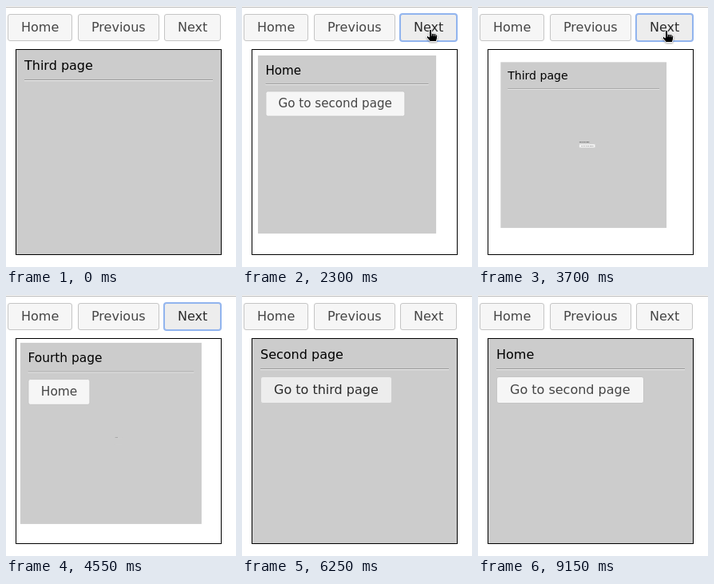
Animation, 288 px wide and 327 px high, one loop 9600 ms. Source, as an HTML page:

```html
<!DOCTYPE html>
<html lang="en">
<head>
<meta charset="utf-8">
<title>Page zoom</title>
<style>
html, body { margin: 0; width: 100%; height: 100%; overflow: hidden; background: #fff; }
body { position: relative; font: 16px/19px "DejaVu Sans", sans-serif; color: #000; cursor: default; }
.rule { position: absolute; left: 0; top: 1px; width: 100%; height: 1px; background: #b8b8b8; }
.btn {
  display: inline-block; box-sizing: border-box; height: 34px; padding: 6.4px 16px;
  border: 1px solid #c5c5c5; border-radius: 3px; background: #f6f6f6; color: #454545;
  white-space: nowrap; vertical-align: top;
}
.btn.hover, .btn.focus { background: #ededed; border-color: #ccc; color: #2b2b2b; }
.btn.focus { border-color: #93b5ee; box-shadow: 0 0 0 1px #8fb3ee; }
.btn.active { background: #007fff; border-color: #003eff; color: #fff; }
.nav { position: absolute; top: 10px; }
.frame {
  position: absolute; left: 12px; top: 54px; width: 256px; height: 256px;
  border: 1px solid #000; overflow: hidden;
}
.page {
  position: absolute; left: 0; top: 0; box-sizing: border-box; padding: 10px;
  background: #ccc; transform-origin: 128px 128px;
}
.page hr { height: 1px; margin: 8px 0; border: 0; border-top: 1px solid #9a9a9a; background: #eee; }
#cursor {
  position: absolute; left: 0; top: 0; width: 1px; height: 1px; overflow: visible;
  filter: drop-shadow(0 1px 1px rgba(0, 0, 0, .35));
}
#cursor path { stroke: #fff; stroke-width: 1; stroke-linejoin: round; }
#cursor .crease { fill: none; stroke-width: .7; }
</style>
</head>
<body>
<div class="rule"></div>
<div class="btn nav" id="navHome" style="left:2px">Home</div>
<div class="btn nav" id="navPrev" style="left:90px">Previous</div>
<div class="btn nav" id="navNext" style="left:198px">Next</div>
<div class="frame" id="frame"></div>
<svg id="cursor">
  <path id="arrow" d="M0 0V15L3.5 11.8L6 17.4L8.3 16.4L5.8 11H10.6Z"/>
  <g id="hand">
    <path d="M-1.6 1.2Q0 -1 1.6 1.2V5.6Q3.2 4.4 4.3 5.9Q5.9 5 6.8 6.6Q8.6 6.2 8.8 8.2L8.4 11.5L7.4 15.5H-.4L-4.6 10.6Q-5.4 8.4 -3.4 8.5L-1.6 9.9Z"/>
    <path class="crease" d="M1.7 6V8.5M4.3 6.4V8.8M6.7 7V9"/>
  </g>
</svg>
<script>
const LOOP = 9600, TICK = 50, ZOOM = 400, BLUR = 9150;
const $ = id => document.getElementById(id);

function makePage(title, label) {
  const el = document.createElement('div');
  el.className = 'page';
  el.innerHTML = `<div>${title}</div><hr>` + (label ? `<div class="btn">${label}</div>` : '');
  $('frame').append(el);
  return { el, btn: el.querySelector('.btn') };
}

const home = makePage('Home', 'Go to second page');
const second = makePage('Second page', 'Go to third page');
const third = makePage('Third page');
const fourth = makePage('Fourth page', 'Home');
const pages = [home, second, third, fourth];
const buttons = [...document.querySelectorAll('.btn')];

// Each click: button goes down, then the zoom from one page to the next starts.
const clicks = [
  { down: 950, go: 1085, btn: $('navHome'), from: third, to: home },
  { down: 2100, go: 2240, btn: $('navNext'), from: home, to: second },
  { down: 3250, go: 3390, btn: $('navNext'), from: second, to: third },
  { down: 4050, go: 4200, btn: $('navNext'), from: third, to: fourth },
  { down: 4950, go: 5040, btn: fourth.btn, from: fourth, to: home },
  { down: 5800, go: 5840, btn: home.btn, from: home, to: second },
  { down: 8050, go: 8125, btn: $('navHome'), from: second, to: home }
];

// Pointer path: time, x, y
const path = [
  [250, 36, -25], [300, 40, 2], [500, 57, 37], [650, 57, 37], [700, 58, 36],
  [1400, 58, 36], [1650, 130, 70], [1900, 222, 29], [2050, 236, 29],
  [2800, 236, 29], [2850, 236, 30], [2950, 236, 30], [3000, 237, 30],
  [3100, 233, 32], [3250, 236, 30], [3900, 236, 30], [4050, 234, 31],
  [4200, 236, 30], [4550, 130, 121], [4900, 66, 119], [5400, 66, 119],
  [5650, 154, 125], [6250, 154, 125], [6500, 205, 160], [6750, 250, 172],
  [7000, 240, 110], [7250, 150, 14], [7450, 80, 2], [7700, 60, 20],
  [7850, 58, 25], [8950, 58, 25], [9100, 50, 3], [9150, 46, -25]
];

const swing = k => .5 - Math.cos(Math.PI * k) / 2;

function pointerAt(t) {
  const i = path.findIndex(p => p[0] > t);
  if (i < 1) return [-50, -50];
  const a = path[i - 1], b = path[i], k = (t - a[0]) / (b[0] - a[0]);
  return [a[1] + (b[1] - a[1]) * k, a[2] + (b[2] - a[2]) * k];
}

function place(page, scale, size, z) {
  const s = page.el.style;
  s.display = scale > 0 ? 'block' : 'none';
  s.width = s.height = size + 'px';
  s.transform = scale === 1 ? 'none' : `scale(${scale})`;
  s.zIndex = z;
}

function showPages(t) {
  const last = clicks.filter(c => c.go <= t).pop();
  const k = last ? (t - last.go) / ZOOM : 1;
  const moving = k < 1;
  for (const p of pages) place(p, 0, 256, 0);
  if (moving) {
    place(last.to, swing(k), 236, 1);
    place(last.from, 1 - swing(k), 236, 2);
  } else {
    place(last ? last.to : third, 1, 256, 1);
  }
  return moving;
}

function render(t) {
  const moving = showPages(t);
  const [x, y] = pointerAt(t);
  const press = clicks.filter(c => c.down <= t).pop();
  let over = false;
  for (const b of buttons) {
    const r = b.getBoundingClientRect();
    const live = !moving || b.classList.contains('nav');
    const hover = live && x >= r.left && x < r.right && y >= r.top && y < r.bottom;
    const focus = !!press && press.btn === b && t < BLUR;
    b.classList.toggle('hover', hover);
    b.classList.toggle('focus', focus);
    b.classList.toggle('active', focus && t < press.go);
    over = over || hover;
  }
  $('cursor').style.transform = `translate(${Math.round(x)}px, ${Math.round(y)}px)`;
  $('hand').style.display = over ? '' : 'none';
  $('arrow').style.display = over ? 'none' : '';
}

const start = performance.now();
function frame() {
  const t = (performance.now() - start) % LOOP;
  render(Math.floor(t / TICK) * TICK);
  requestAnimationFrame(frame);
}
render(0);
requestAnimationFrame(frame);
</script>
</body>
</html>
```
